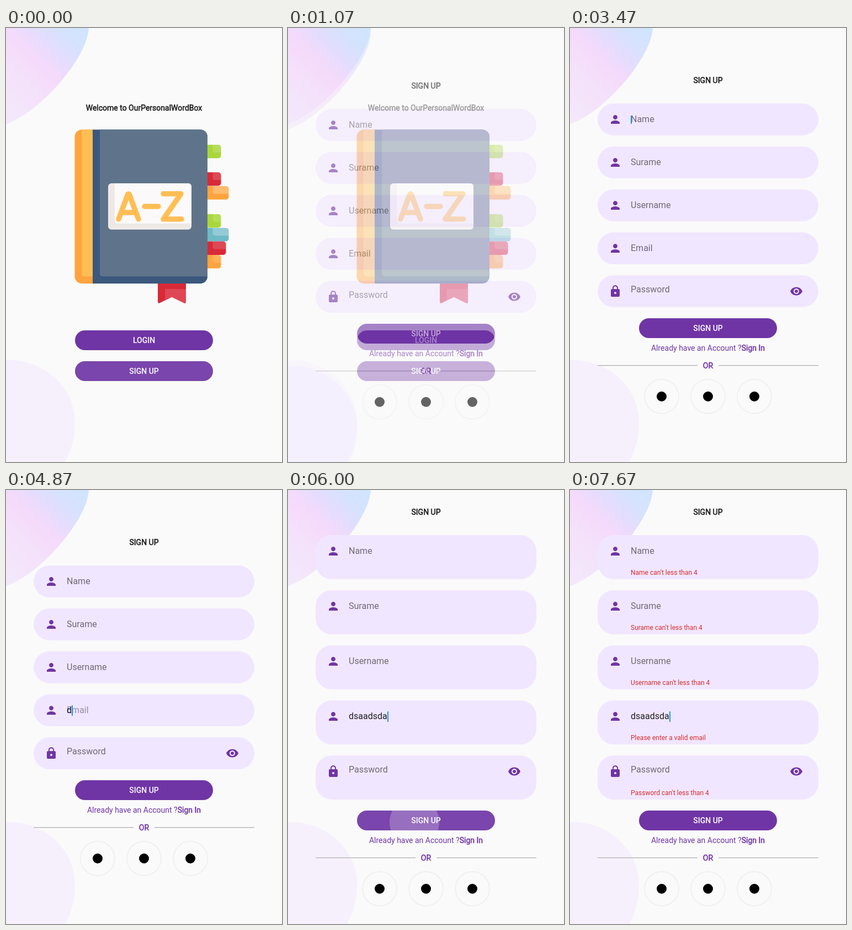
An HTML page that plays this animation: 500 px wide and 788 px high, repeating every 8 s.

```html
<!DOCTYPE html>
<html lang="en">
<head>
<meta charset="utf-8">
<title>Welcome and sign up</title>
<style>
  :root { --purple: #6f35a5; --field: #f1e6ff; }
  * { box-sizing: border-box; }
  html, body { margin: 0; width: 100%; height: 100%; overflow: hidden; background: #fafafa; }
  body { font: 14px/16px Roboto, sans-serif; color: rgba(0, 0, 0, .87); }

  .page { position: absolute; left: 0; top: 0; width: 500px; height: 788px; background: #fafafa; }
  .page > svg { position: absolute; left: 0; top: 0; }
  .bold { -webkit-text-stroke: .5px currentColor; }
  .title { text-align: center; color: rgba(0, 0, 0, .87); }
  .welcome .title { position: absolute; top: 137px; width: 100%; }

  /* every animation shares one clock */
  .signup, .field, .hint.gone, .typed, .caret, .error, .hover, .splash {
    animation: 8s step-end infinite;
  }

  .button {
    position: relative; width: 250px; height: 36px; border-radius: 18px; overflow: hidden;
    background: var(--purple); color: #fff; font-weight: 500; line-height: 36px; text-align: center;
  }
  .button span { position: relative; }
  .welcome .button { position: absolute; left: 125px; top: 549px; }
  .welcome .button.second { top: 605px; }
  .hover { position: absolute; inset: 0; background: rgba(255, 255, 255, .08); }
  .splash {
    position: absolute; width: 90px; height: 90px; margin: -45px; border-radius: 50%;
    background: #fff; opacity: 0;
  }
  .welcome .splash { left: 218px; top: 18px; animation-name: splash-open; }
  .signup .splash { left: 103.5px; top: 21px; animation-name: splash-send; }
  .signup .hover { animation-name: hover; }

  .signup { animation-name: enter; }
  .column {
    position: relative; height: 100%; display: flex; flex-direction: column;
    justify-content: center; align-items: center;
  }
  .column .title { margin-bottom: 34px; }
  .field {
    position: relative; flex: none; width: 400px; height: 58px; margin-bottom: 20px;
    border-radius: 29px; background: var(--field); animation-name: grow;
  }
  .field svg { position: absolute; left: 20px; top: 17px; fill: var(--purple); }
  .field svg.eye { left: 348px; }
  .hint, .typed { position: absolute; left: 60px; top: 19px; font-size: 16px; line-height: 20px; white-space: nowrap; }
  .hint { color: rgba(0, 0, 0, .54); }
  .hint.high { top: 16px; }
  .hint.gone { animation-name: hint; }
  .typed { overflow: hidden; width: 0; animation-name: type; }
  .caret { position: absolute; left: 60px; top: 22px; width: 2px; height: 15px; background: #2196f3; opacity: 0; }
  .caret.first { animation-name: caret-first; }
  .caret.third { animation-name: caret-third; }
  .caret.fourth { animation-name: caret-move, caret-fourth; }
  .error {
    position: absolute; left: 60px; top: 61px; font-size: 12px; line-height: 14px;
    color: #d32f2f; white-space: nowrap; animation-name: error;
  }

  .have { margin: 10px 0 16px; color: var(--purple); white-space: nowrap; }
  .or { display: flex; width: 400px; justify-content: space-between; color: var(--purple); }
  .or i { width: 181px; height: 1px; margin-top: 7px; background: #b8b8b8; box-shadow: 0 1px #dcdcdc; }
  .social { display: flex; gap: 20px; margin-top: 16px; }
  .social i {
    width: 64px; height: 64px; border: 2px solid #f1eff3; border-radius: 50%;
    display: grid; place-items: center;
  }
  .social i::after { content: ""; width: 18px; height: 18px; border-radius: 50%; background: #000; }

  @keyframes enter {
    0% { opacity: 0; transform: translateY(10px); }
    13.375% { opacity: .6; transform: translateY(10px); }
    14.125% { opacity: .87; transform: translateY(1px); }
    15%, 100% { opacity: 1; transform: none; }
  }
  @keyframes splash-open {
    0% { opacity: 0; }
    10% { opacity: .22; transform: scale(.35); }
    10.875% { opacity: .22; transform: scale(.8); }
    13.375%, 100% { opacity: 0; }
  }
  @keyframes splash-send {
    0% { opacity: 0; }
    74.125% { opacity: .22; transform: scale(.4); }
    75% { opacity: .23; transform: none; }
    75.875% { opacity: .16; transform: translateX(8px) scale(1.8); }
    76.625% { opacity: .09; transform: translateX(14px) scale(2.5); }
    77.5% { opacity: .03; transform: translateX(20px) scale(3.2); }
    78.375%, 100% { opacity: 0; }
  }
  @keyframes hover {
    0% { opacity: 0; }
    70.875% { opacity: 1; }
    79.125% { opacity: .5; }
    80%, 100% { opacity: 0; }
  }
  @keyframes grow {
    0% { height: 58px; }
    75%, 100% { height: 80px; }
  }
  @keyframes error {
    0% { opacity: 0; }
    75.875% { opacity: .35; transform: translateY(-2px); }
    76.625% { opacity: .67; transform: translateY(-1px); }
    77.5%, 100% { opacity: 1; transform: none; }
  }
  @keyframes hint {
    0% { opacity: 1; }
    60.875% { opacity: .72; }
    61.625% { opacity: .38; }
    62.5% { opacity: .08; }
    63.375%, 100% { opacity: 0; }
  }
  @keyframes type {
    0% { width: 0; }
    60.875% { width: 9px; }
    62.5% { width: 17.3px; }
    63.375% { width: 26px; }
    66.625% { width: 34.7px; }
    67.5% { width: 43.7px; }
    68.375% { width: 52px; }
    69.125% { width: 61px; }
    70%, 100% { width: 72px; }
  }
  @keyframes caret-move {
    0% { top: 22px; height: 15px; transform: none; }
    60.875% { top: 20px; height: 19px; transform: translateX(9px); }
    62.5% { top: 20px; height: 19px; transform: translateX(17px); }
    63.375% { top: 20px; height: 19px; transform: translateX(26px); }
    66.625% { top: 20px; height: 19px; transform: translateX(35px); }
    67.5% { top: 20px; height: 19px; transform: translateX(44px); }
    68.375% { top: 20px; height: 19px; transform: translateX(52px); }
    69.125% { top: 20px; height: 19px; transform: translateX(61px); }
    70%, 100% { top: 20px; height: 19px; transform: translateX(70px); }
  }
  @keyframes caret-first {
    0%, 37.5%, 44.125%, 100% { opacity: 0; }
    30.875%, 43.375% { opacity: 1; }
  }
  @keyframes caret-third {
    0%, 50%, 58.375%, 100% { opacity: 0; }
    44.125%, 56.625% { opacity: 1; }
  }
  @keyframes caret-fourth {
    0%, 76.625%, 90% { opacity: 0; }
    58.375%, 83.375%, 95.875%, 100% { opacity: 1; }
  }
</style>
</head>
<body>

<div class="page welcome">
  <svg width="500" height="788">
    <defs>
      <linearGradient id="sky" gradientUnits="userSpaceOnUse" x1="150" y1="0" x2="-10" y2="160">
        <stop offset="0" stop-color="#cfe5ff"/>
        <stop offset=".18" stop-color="#d6e2fe"/>
        <stop offset=".34" stop-color="#e7dcfd"/>
        <stop offset=".47" stop-color="#f5dafb"/>
        <stop offset=".66" stop-color="#f4e1fa"/>
        <stop offset="1" stop-color="#f3e9fb"/>
      </linearGradient>
      <symbol id="blobs" viewBox="0 0 500 788">
        <path fill="url(#sky)" d="M0 0H150C147 55 62 153 0 174.500Z"/>
        <path fill="#f6f0fd" d="M0 603C60 600 125 645 125 718C125 745 118 768 107 788H0Z"/>
      </symbol>
      <symbol id="person" viewBox="0 0 24 24">
        <path d="M12 12c2.210 0 4-1.790 4-4s-1.790-4-4-4-4 1.790-4 4 1.790 4 4 4zm0 2c-2.670 0-8 1.340-8 4v2h16v-2c0-2.660-5.330-4-8-4z"/>
      </symbol>
      <!-- bookmark tab, 25 tall, stretched by its own width -->
      <g id="short"><path d="M0 0H20a5 5 0 0 1 5 5V19.500a5 5 0 0 1-5 5H0Z"/><path fill="#fff" fill-opacity=".15" d="M10 0H20a5 5 0 0 1 5 5V14H14a4 4 0 0 1-4-4Z"/></g>
      <g id="mid"><path d="M0 0H29a5 5 0 0 1 5 5V19.500a5 5 0 0 1-5 5H0Z"/><path fill="#fff" fill-opacity=".15" d="M10 0H29a5 5 0 0 1 5 5V14H14a4 4 0 0 1-4-4Z"/></g>
      <g id="long"><path d="M0 0H34a5 5 0 0 1 5 5V19.500a5 5 0 0 1-5 5H0Z"/><path fill="#fff" fill-opacity=".25" d="M10 0H34a5 5 0 0 1 5 5V14H14a4 4 0 0 1-4-4Z"/></g>
      <clipPath id="cover"><rect x="124.500" y="184.500" width="240.500" height="279.500" rx="13"/></clipPath>
    </defs>
    <use href="#blobs" width="500" height="788"/>
    <g transform="translate(364.500)">
      <use href="#short" y="212" fill="#a9d73b"/>
      <use href="#short" y="262" fill="#d92a37"/>
      <use href="#long" y="287" fill="#ffa43e"/>
      <use href="#short" y="338" fill="#a9d73b"/>
      <use href="#long" y="363" fill="#6fb9c7"/>
      <use href="#mid" y="387.500" fill="#d92a37"/>
      <use href="#short" y="412" fill="#ffa43e"/>
    </g>
    <path fill="#d92a37" d="M275 462H326V497q0 4-4 2L300.500 488.500L279 499q-4 2-4-2Z"/>
    <path fill="#df4754" d="M288 474H326V497q0 4-4 2L300.500 488.500L288 494.500Z"/>
    <g clip-path="url(#cover)">
      <path fill="#ffa43e" d="M124 184H158V464H124Z"/>
      <path fill="#ffbe54" d="M137 184H158V451H142a5 5 0 0 1-5-5Z"/>
      <path fill="#3b587d" d="M157 184H366V465H157Z"/>
      <path fill="#5f748a" d="M170 184H366V451H175a5 5 0 0 1-5-5Z"/>
    </g>
    <rect x="185" y="282" width="151" height="84" rx="6" fill="#efe9e6"/>
    <path fill="#fbf9fa" d="M197 282H330a6 6 0 0 1 6 6V355H202a5 5 0 0 1-5-5Z"/>
    <path fill="none" stroke="#ffbe54" stroke-width="9.500" stroke-linecap="round" stroke-linejoin="round"
      d="M204 347L220.500 302.500Q222 300 223.500 302.500L240 347M211 335H233M251 324H276M285 301H317L285 347H318"/>
  </svg>
  <div class="title bold">Welcome to OurPersonalWordBox</div>
  <div class="button"><span>LOGIN</span></div>
  <div class="button second"><b class="hover"></b><b class="splash"></b><span>SIGN UP</span></div>
</div>

<div class="page signup">
  <svg width="500" height="788"><use href="#blobs" width="500" height="788"/></svg>
  <div class="column">
    <div class="title bold">SIGN UP</div>
    <div class="field">
      <svg width="24" height="24"><use href="#person"/></svg>
      <div class="hint">Name</div><div class="caret first"></div>
      <div class="error">Name can't less than 4</div>
    </div>
    <div class="field">
      <svg width="24" height="24"><use href="#person"/></svg>
      <div class="hint">Surame</div>
      <div class="error">Surame can't less than 4</div>
    </div>
    <div class="field">
      <svg width="24" height="24"><use href="#person"/></svg>
      <div class="hint">Username</div><div class="caret third"></div>
      <div class="error">Username can't less than 4</div>
    </div>
    <div class="field">
      <svg width="24" height="24"><use href="#person"/></svg>
      <div class="hint gone">Email</div>
      <div class="typed">dsaadsda</div><div class="caret fourth"></div>
      <div class="error">Please enter a valid email</div>
    </div>
    <div class="field">
      <svg width="24" height="24"><path d="M18 8h-1V6c0-2.760-2.240-5-5-5S7 3.240 7 6v2H6c-1.100 0-2 .9-2 2v10c0 1.100.9 2 2 2h12c1.100 0 2-.9 2-2V10c0-1.100-.9-2-2-2zm-6 9c-1.100 0-2-.9-2-2s.9-2 2-2 2 .9 2 2-.9 2-2 2zm3.100-9H8.900V6c0-1.710 1.390-3.100 3.100-3.100 1.710 0 3.100 1.390 3.100 3.100v2z"/></svg>
      <div class="hint high">Password</div>
      <svg class="eye" width="24" height="24"><path d="M12 4.500C7 4.500 2.730 7.610 1 12c1.730 4.390 6 7.500 11 7.500s9.270-3.110 11-7.500c-1.730-4.390-6-7.500-11-7.500zM12 17c-2.760 0-5-2.240-5-5s2.240-5 5-5 5 2.240 5 5-2.240 5-5 5zm0-8c-1.660 0-3 1.340-3 3s1.340 3 3 3 3-1.340 3-3-1.340-3-3-3z"/></svg>
      <div class="error">Password can't less than 4</div>
    </div>
    <div class="button"><b class="hover"></b><b class="splash"></b><span>SIGN UP</span></div>
    <div class="have">Already have an Account ?<span class="bold">Sign In</span></div>
    <div class="or"><i></i><span class="bold">OR</span><i></i></div>
    <div class="social"><i></i><i></i><i></i></div>
  </div>
</div>

</body>
</html>
```
